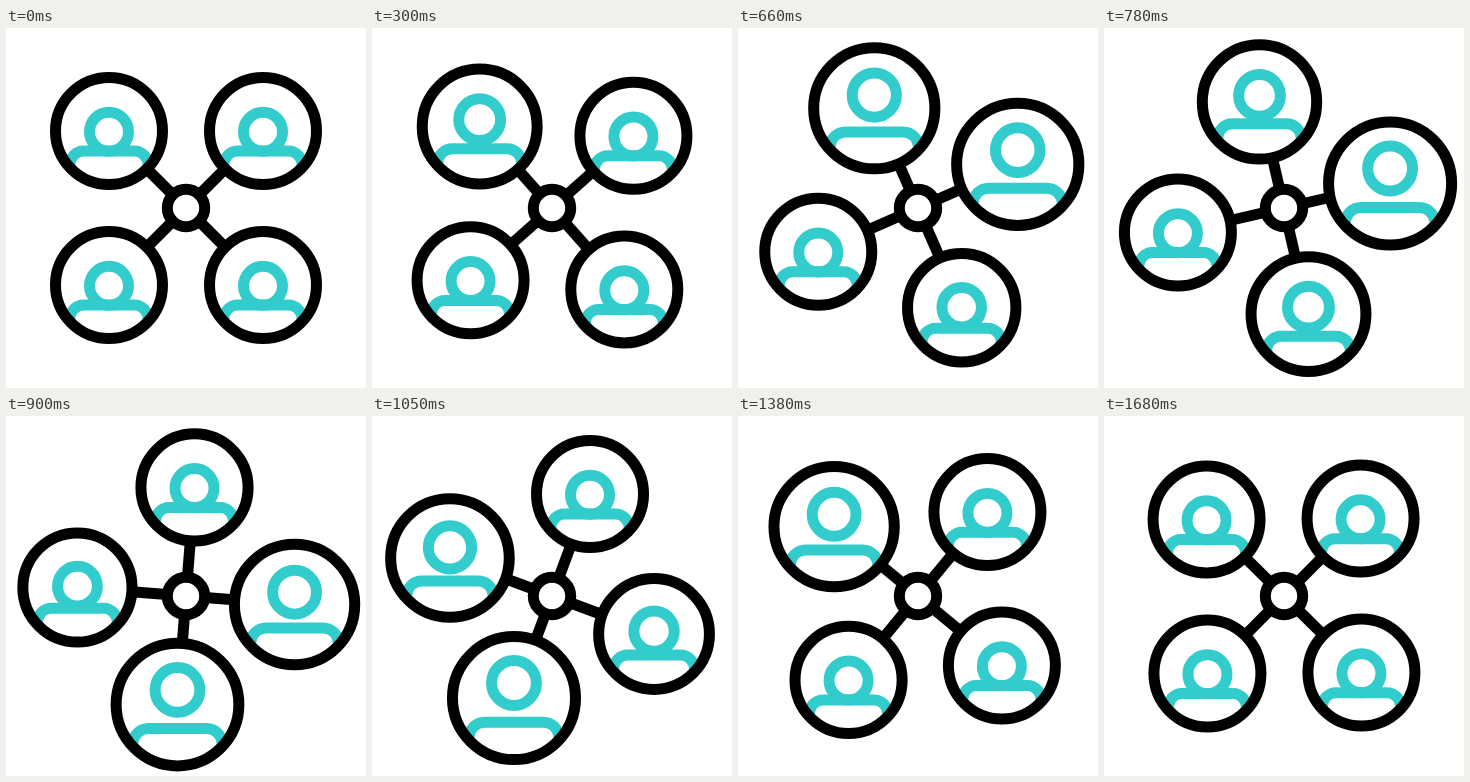
These frames come from a looping animation (360x360 px, 1710 ms). An HTML page:

```html
<!DOCTYPE html>
<html lang="en">
<head>
<meta charset="utf-8">
<title>Network</title>
<style>
  html, body { margin: 0; width: 100%; height: 100%; overflow: hidden; background: #fff; }
  svg { display: block; width: 100vw; height: 100vh; }
  .ink { stroke: #000; fill: #fff; stroke-width: 11; }
  .person { stroke: #33cccc; fill: none; stroke-width: 11; }
  .ring { fill: none; }
</style>
</head>
<body>
<svg viewBox="0 0 360 360">
  <g id="stage" transform="translate(180 180)"></g>
</svg>
<script>
const LOOP = 1710, TICK = 30, TURN_STEPS = 50, ORBIT = 108.9;
const STAGGER = 6.5, PULSE_RISE = 4.3, PULSE_FALL = 17, PULSE_LENGTH = 9.5;
const RING_RADIUS = 53.5, HEAD_RADIUS = 19.5, GROWTH = 0.15;
const stage = document.getElementById('stage');

function set(element, attributes) {
  for (const [name, value] of Object.entries(attributes)) element.setAttribute(name, value);
  return element;
}

function add(parent, tag, attributes = {}) {
  const element = document.createElementNS('http://www.w3.org/2000/svg', tag);
  return parent.appendChild(set(element, attributes));
}

const spokes = [0, 1, 2, 3].map(() => add(stage, 'line', { class: 'ink' }));
const nodes = spokes.map((spoke, index) => {
  const group = add(stage, 'g');
  const disc = add(group, 'circle', { fill: '#fff' });
  const body = add(group, 'path', { class: 'person' });
  const head = add(group, 'circle', { class: 'person' });
  const ring = add(group, 'circle', { class: 'ink ring', style: 'fill:none' });
  return { spoke, group, disc, body, head, ring, index };
});
add(stage, 'circle', { r: 18.7, class: 'ink' });

function smooth(x) {
  x = Math.min(1, Math.max(0, x));
  return x * x * (3 - 2 * x);
}

// cubic-bezier(.6, 0, .4, 1)
function easeTurn(x) {
  let low = 0, high = 1;
  for (let i = 0; i < 30; i++) {
    const s = (low + high) / 2, r = 1 - s;
    if (1.8 * s * r * r + 1.2 * s * s * r + s * s * s < x) low = s;
    else high = s;
  }
  return smooth(low);
}

// Every sixth tick repeats the previous pose.
function stepAt(time) {
  const tick = Math.floor(time / TICK);
  return tick - Math.trunc((tick - 1) / 6);
}

function shoulders(scale, top) {
  const side = 39 * scale, corner = 13.5 * scale, flat = 51 * scale, drop = 3 * scale;
  return `M${-side} ${top + corner + drop}v${-drop}` +
    `a${corner} ${corner} 0 0 1 ${corner} ${-corner}h${flat}` +
    `a${corner} ${corner} 0 0 1 ${corner} ${corner}v${drop}`;
}

function draw(time) {
  const step = stepAt(time % LOOP);
  const turn = easeTurn(step / TURN_STEPS) * Math.PI / 2;
  for (const { spoke, group, disc, body, head, ring, index } of nodes) {
    const angle = (index - 1.5) * Math.PI / 2 + turn;
    const x = ORBIT * Math.cos(angle), y = ORBIT * Math.sin(angle);
    const local = step - index * STAGGER;
    const pulse = smooth((local - PULSE_RISE) / PULSE_LENGTH)
                - smooth((local - PULSE_FALL) / PULSE_LENGTH);
    // Sizes grow with the pulse; line weights stay constant.
    const scale = 1 + GROWTH * pulse;
    set(spoke, { x2: x, y2: y });
    set(group, { transform: `translate(${x} ${y})` });
    set(disc, { r: RING_RADIUS * scale });
    set(ring, { r: RING_RADIUS * scale });
    set(head, { r: HEAD_RADIUS * scale, cy: 0.8 - 15.8 * pulse });
    set(body, { d: shoulders(scale, 20.1 + 4 * pulse) });
  }
}

const start = performance.now();
function frame() {
  draw(performance.now() - start);
  requestAnimationFrame(frame);
}
frame();
</script>
</body>
</html>
```
